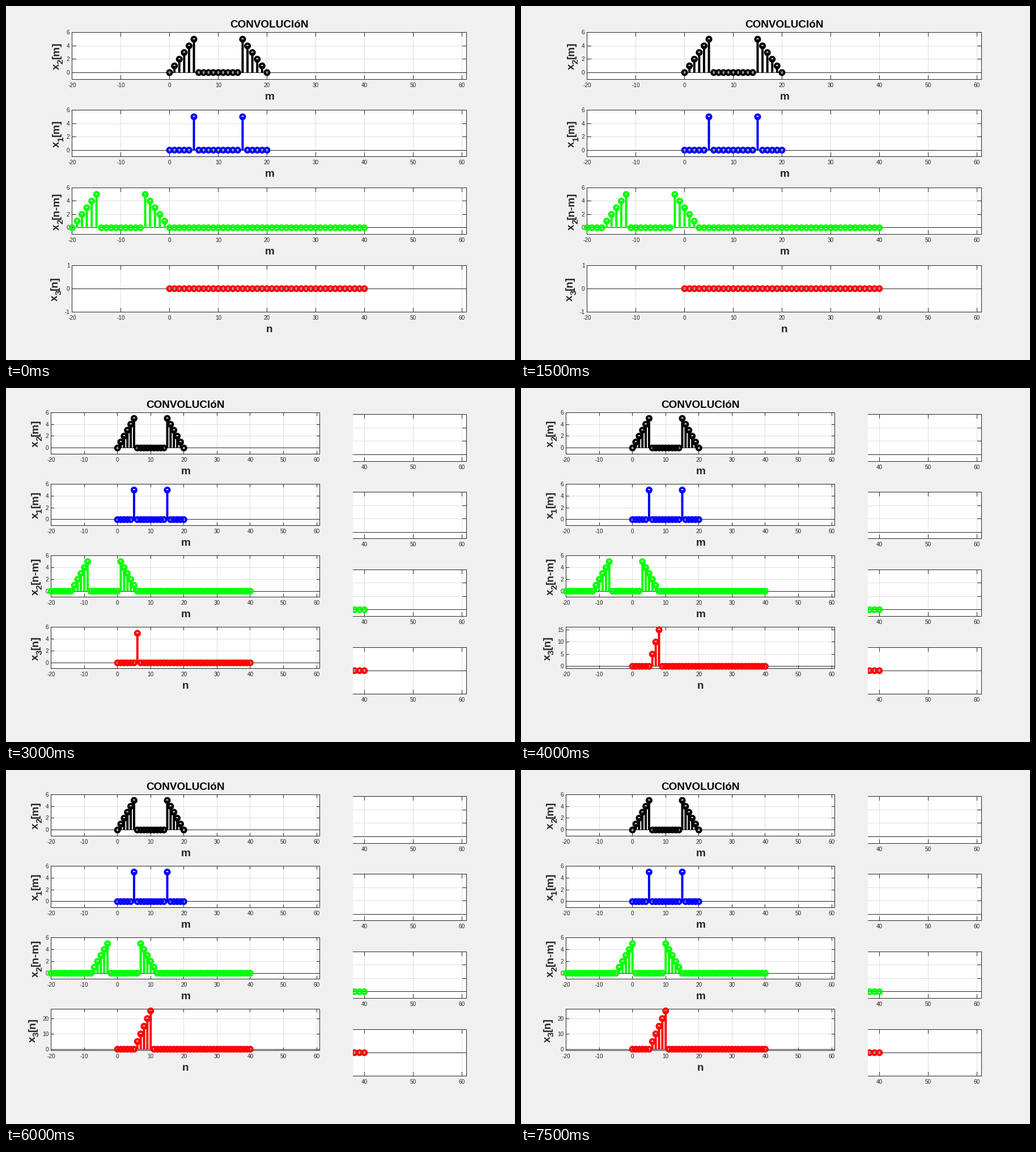
Recreate the animation shown at these times as a matplotlib script. Size 898 by 624 pixels, loop 8000 ms.

```python
import math
import numpy as np
import matplotlib.pyplot as plt
from matplotlib.animation import FuncAnimation
from matplotlib.patches import Circle, Rectangle

W, H, DPI = 898, 624, 64
PT = 72 / DPI  # points per pixel
BG, INK, GRID = "#f0f0f0", "#262626", "#dedede"
TICK, LABEL = 10, 19  # font sizes in pixels
STEM, RADIUS = 4, 4  # stem width and marker radius in pixels

plt.rcParams["font.family"] = "Liberation Sans"
fig = plt.figure(figsize=(W / DPI, H / DPI), dpi=DPI, facecolor=BG)
ax = fig.add_axes([0, 0, 1, 1])

n = np.arange(21)
x2 = np.where(n <= 5, n, np.where(n >= 15, 20 - n, 0))
x1 = np.where((n == 5) | (n == 15), 5, 0)
n_out = np.arange(41)
conv = np.convolve(x1, x2)
m_flip = np.arange(-20, 41)


def flipped(k):
    i = k - m_flip
    return np.where((i >= 0) & (i <= 20), x2[np.clip(i, 0, 20)], 0)


def pixel(v):
    """Centre of the pixel that holds v."""
    return math.floor(v) + 0.5


def line(xs, ys, color=INK, width=1.0, cap="projecting"):
    ax.plot(xs, ys, color=color, lw=width * PT, zorder=2, snap=False,
            solid_capstyle=cap, solid_joinstyle="miter")


def box(x, y, w, h, color):
    ax.add_patch(Rectangle((x, y), w, h, fc=color, ec="none", zorder=2))


def text(x, y, s, size, bold=False, color=INK, ha="center", rot=0):
    ax.text(x, y, s, fontsize=size * PT, color=color, ha=ha, va="baseline",
            weight="bold" if bold else "normal", rotation=rot,
            rotation_mode="anchor", zorder=2)


def em(s):
    """Advance width of a label in em."""
    special = {"[": 0.333, "]": 0.333, "-": 0.333, "m": 0.889, "n": 0.611}
    return sum(special.get(c, 0.556) for c in s)


def ylabel(x, yc, sub, arg):
    """Rotated bold x_sub[arg], centred on yc."""
    rest = f"[{arg}]"
    small = 0.8 * LABEL
    start = em("x") * LABEL
    after = start + em(sub) * small
    y = yc + (after + em(rest) * LABEL) / 2
    text(x, y, "x", LABEL, True, ha="left", rot=90)
    text(x + 6.5, y - start, sub, small, True, ha="left", rot=90)
    text(x, y - after, rest, LABEL, True, ha="left", rot=90)


def stems(xs, ys, base, color):
    for x, y in zip(xs, ys):
        if y < base:
            line([x, x], [base, y], color, STEM, "butt")
    for x, y in zip(xs, ys):
        ax.add_patch(Circle((x, y), RADIUS, fill=False, ec=color,
                            lw=STEM * PT, zorder=2))


def panel(w, h, row, height, xs, ys, color, sub, arg, xlabel):
    left, right = 0.13 * w, 0.905 * w
    top = (0.075 + 0.2192 * row) * h
    bottom = top + height
    lo, hi = -1, max(ys) + 1
    step = {0: 1, 5: 2, 10: 5, 15: 5}.get(int(max(ys)), 10)
    yticks = np.arange(math.ceil(lo / step) * step, hi + 0.1, step)

    def px(v):
        return left + (v + 20) * (right - left) / 81

    def py(v):
        return bottom - (v - lo) * height / (hi - lo)

    xl, xr, yt, yb = pixel(left), pixel(right), pixel(top), pixel(bottom)
    tick = round(0.01 * (right - left))
    box(xl, yt, xr - xl, yb - yt, "white")
    gx = [(v, pixel(px(v))) for v in range(-20, 61, 10)]
    gy = [(v, pixel(py(v))) for v in yticks]
    for _, x in gx:
        line([x, x], [yt, yb], GRID)
    for _, y in gy:
        line([xl, xr], [y, y], GRID)
    line([xl, xr, xr, xl, xl], [yt, yt, yb, yb, yt])
    for v, x in gx:
        line([x, x], [yt, yt + tick])
        line([x, x], [yb, yb - tick])
        text(px(v), bottom + 13.6, str(v), TICK)
    for v, y in gy:
        line([xl, xl + tick], [y, y])
        line([xr, xr - tick], [y, y])
        text(left - 4.3, y + 3.6, str(int(v)), TICK, ha="right")

    widest = max(em(str(int(v))) for v in yticks)
    ylabel(left - 22.6 - (widest - 0.556) * TICK, (top + bottom) / 2, sub, arg)
    text((left + right) / 2, bottom + 35.6, xlabel, LABEL, True)
    if row == 0:
        text((left + right) / 2, top - 8.4, "CONVOLUCIóN", LABEL, True,
             "black")

    base = pixel(py(0))
    line([xl, xr], [base, base])
    stems(px(np.array(xs)), py(np.array(ys)), py(0), color)


def figure(w, h, height, k):
    out = np.where(n_out <= k, conv, 0)
    panel(w, h, 0, height, n, x2, "#000000", "2", "m", "m")
    panel(w, h, 1, height, n, x1, "#0000ff", "1", "m", "m")
    panel(w, h, 2, height, m_flip, flipped(k), "#00ff00", "2", "n-m", "m")
    panel(w, h, 3, height, n_out, out, "#ff0000", "3", "n", "n")


def draw(k):
    ax.clear()
    ax.set_xlim(0, W)
    ax.set_ylim(H, 0)
    ax.axis("off")
    figure(W, H, 82.25, min(k, 5))
    if k > 5:  # the window shrinks and leaves the old right edge behind
        box(0, 0, 612, 576, BG)
        figure(612, 576, 72.9, k)
    return []


anim = FuncAnimation(fig, draw, frames=16, interval=500, repeat=True,
                     repeat_delay=0, init_func=lambda: [], blit=False)
plt.show()
```
